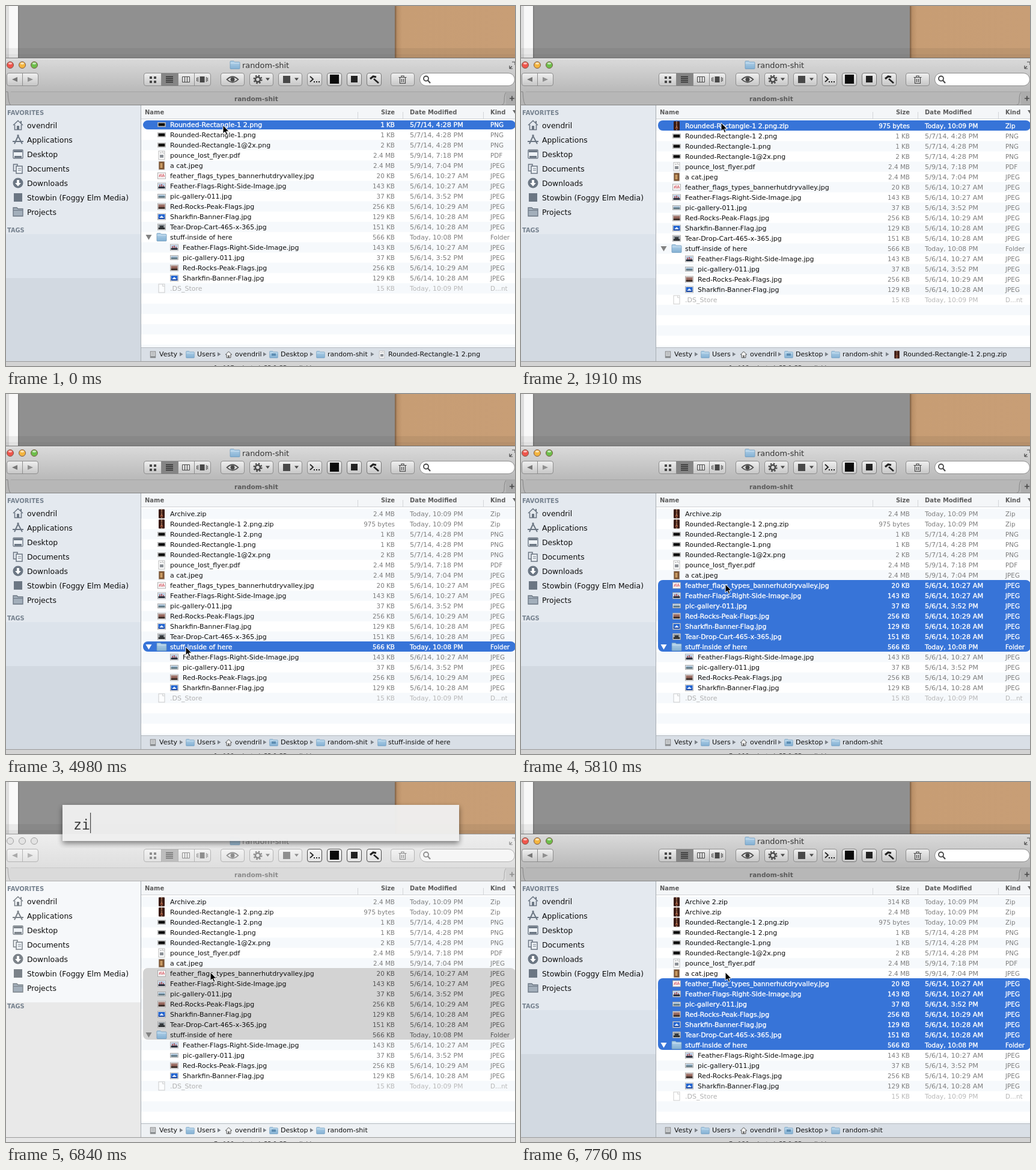
Animation of 847x598 px, one loop 8 s. Source, as an HTML page:

```html
<!DOCTYPE html>
<html lang="en">
<head>
<meta charset="utf-8">
<title>File window</title>
<style>
html, body { margin: 0; width: 100%; height: 100%; overflow: hidden; background: #909090; }
svg { display: block; width: 847px; height: 598px; }
text { font-family: 'DejaVu Sans', sans-serif; white-space: pre; }
.b { font-weight: bold; }
.ui { font-family: 'Liberation Sans', sans-serif; }
.mono { font-family: 'DejaVu Sans Mono', monospace; }
</style>
</head>
<body>
<svg viewBox="0 0 847 598" xmlns="http://www.w3.org/2000/svg">
  <defs>
    <linearGradient id="barOn" x2="0" y2="1"><stop stop-color="#dadada"/><stop offset="1" stop-color="#b8b8b8"/></linearGradient>
    <linearGradient id="barOff" x2="0" y2="1"><stop stop-color="#eeeeee"/><stop offset="1" stop-color="#dedede"/></linearGradient>
    <linearGradient id="btnOn" x2="0" y2="1"><stop stop-color="#f0f0f0"/><stop offset="1" stop-color="#c6c6c6"/></linearGradient>
    <linearGradient id="btnOff" x2="0" y2="1"><stop stop-color="#f4f4f4"/><stop offset="1" stop-color="#e2e2e2"/></linearGradient>
    <linearGradient id="tan"><stop stop-color="#7d5f44"/><stop offset=".02" stop-color="#b98f67"/><stop offset=".06" stop-color="#c79d74"/><stop offset="1" stop-color="#c89e76"/></linearGradient>
    <linearGradient id="fold" x2="0" y2="1"><stop stop-color="#b4d3ea"/><stop offset="1" stop-color="#83b0d3"/></linearGradient>
    <filter id="shade" x="-5%" y="-10%" width="110%" height="130%"><feDropShadow dx="0" dy="4" stdDeviation="5" flood-opacity=".5"/></filter>
  </defs>
  <g id="scene"></g>
  <g id="launcher"></g>
  <path id="cursor" d="M0 0V14L3.3 11L5.7 16.4L8 15.4L5.7 10.2H10Z" fill="#000" stroke="#fff" stroke-width="1"/>
</svg>
<script>
const LOOP = 8000;
const $ = id => document.getElementById(id);

const rect = (x, y, w, h, fill, more = '') => `<rect x="${x}" y="${y}" width="${w}" height="${h}" fill="${fill}" ${more}/>`;
const text = (x, y, size, str, fill, more = '') => `<text x="${x}" y="${y}" font-size="${size}" fill="${fill}" ${more}>${str}</text>`;
const fillPath = (d, fill, more = '') => `<path d="${d}" fill="${fill}" ${more}/>`;
const line = (d, stroke, w = 1, more = '') => `<path d="${d}" fill="none" stroke="${stroke}" stroke-width="${w}" ${more}/>`;
const at = (x, y, body, more = '') => `<g transform="translate(${x} ${y})" ${more}>${body}</g>`;
const END = 'text-anchor="end"', BOLD = 'class="b"';

// Small icons, drawn around their own centre.
const thumb = (top, low, extra = '') =>
  rect(-6.5, -5, 13, 10, '#fff', 'stroke="#9c9c9c" stroke-width=".8"') +
  rect(-5.5, -4, 11, 5, top) + rect(-5.5, 1, 11, 3, low) + extra;
const sheet = rect(-5, -7, 10, 14, '#fff', 'stroke="#b9b9b9"') + fillPath('M1.5 -7V-3.5H5', '#eee', 'stroke="#b9b9b9" stroke-width=".8"');
const icons = {
  png: rect(-6.5, -3.5, 13, 7, '#fff', 'stroke="#a8a8a8" stroke-width=".8"') + rect(-5.5, -2.5, 11, 5, '#0c0c0c'),
  pdf: sheet + rect(-3, -1, 6, 5, '#8b9096') + line('M-3 -4H0', '#999'),
  doc: sheet,
  ghost: rect(-7, -7, 14, 14, '#eef4f6', 'stroke="#c3d3da" stroke-dasharray="1 1"'),
  cat: rect(-5, -7, 10, 14, '#7a5230', 'stroke="#ddd"') + rect(-2.5, -4, 4, 8, '#c89a62'),
  feather: thumb('#fbf1f1', '#f6f6f6', line('M-4 2L-3 -2M-1 2V-3M1 2L3 -3M4 2V-1', '#cf4a55', 1.1)),
  flags: thumb('#b7cde6', '#2c3340', line('M-3 1V-2M0 1V-3M3 1V-1', '#a5322f', 1.4)),
  pic: rect(-6.5, -3.5, 13, 7, '#fff', 'stroke="#9c9c9c" stroke-width=".8"') + rect(-5.5, -2.5, 11, 2.5, '#9fb9cf') + rect(-5.5, 0, 11, 2.5, '#56707c'),
  rocks: thumb('#94645a', '#40302b', line('M-5 -3H5', '#c9b8b4')),
  shark: thumb('#2265d2', '#1747a6', fillPath('M-4 2L0 -2L4 2Z', '#dfe9fa')),
  tear: thumb('#8d949a', '#2e3133', rect(-3, -2, 6, 4, '#34383b')),
  zip: rect(-5, -7.5, 10, 15, '#3a1a13', 'rx="1"') + line('M0 -7V7', '#d8a27c', 2, 'stroke-dasharray="1.2 1.4"') + rect(-2, 2, 4, 3, '#8e4a33'),
  folder: fillPath('M-8 -5.5Q-8 -6.5 -7 -6.5H-2L-.5 -5H7Q8 -5 8 -4V5.5Q8 6.5 7 6.5H-7Q-8 6.5 -8 5.5Z', 'url(#fold)', 'stroke="#6f9bbd" stroke-width=".8"') + line('M-7.5 -3H7.5', '#cfe4f3'),
  drive: rect(-5, -6, 10, 12, '#d2d4d6', 'stroke="#777"') + rect(-5, 3, 10, 3, '#85898c') + line('M-3 -3H3M-3 0H3', '#9a9da0'),
  home: fillPath('M-6 0L0 -6L6 0H4V6H-4V0Z', '#f3f3f3', 'stroke="#444" stroke-width="1.1"') + rect(-1.3, 1.5, 2.6, 4.5, '#555')
};

const row = (name, size, date, kind, icon, deep = 0) => ({ name, size, date, kind, icon, deep });
const FF = ['Feather-Flags-Right-Side-Image.jpg', '143 KB', '5/6/14, 10:27 AM', 'JPEG', 'flags'];
const PG = ['pic-gallery-011.jpg', '37 KB', '5/6/14, 3:52 PM', 'JPEG', 'pic'];
const RR = ['Red-Rocks-Peak-Flags.jpg', '256 KB', '5/6/14, 10:29 AM', 'JPEG', 'rocks'];
const SB = ['Sharkfin-Banner-Flag.jpg', '129 KB', '5/6/14, 10:28 AM', 'JPEG', 'shark'];
const NOW = 'Today, 10:09 PM', PNG_DATE = '5/7/14, 4:28 PM';
const files = [
  row('Rounded-Rectangle-1 2.png', '1 KB', PNG_DATE, 'PNG', 'png'),
  row('Rounded-Rectangle-1.png', '1 KB', PNG_DATE, 'PNG', 'png'),
  row('Rounded-Rectangle-1@2x.png', '2 KB', PNG_DATE, 'PNG', 'png'),
  row('pounce_lost_flyer.pdf', '2.4 MB', '5/9/14, 7:18 PM', 'PDF', 'pdf'),
  row('a cat.jpeg', '2.4 MB', '5/9/14, 7:04 PM', 'JPEG', 'cat'),
  row('feather_flags_types_bannerhutdryvalley.jpg', '20 KB', '5/6/14, 10:27 AM', 'JPEG', 'feather'),
  row(...FF), row(...PG), row(...RR), row(...SB),
  row('Tear-Drop-Cart-465-x-365.jpg', '151 KB', '5/6/14, 10:28 AM', 'JPEG', 'tear'),
  row('stuff-inside of here', '566 KB', 'Today, 10:08 PM', 'Folder', 'folder'),
  row(...FF, 1), row(...PG, 1), row(...RR, 1), row(...SB, 1),
  row('.DS_Store', '15 KB', NOW, 'D...nt', 'doc')
];
const archives = [
  row('Rounded-Rectangle-1 2.png.zip', '975 bytes', NOW, 'Zip', 'zip'),
  row('Archive.zip', '2.4 MB', NOW, 'Zip', 'zip'),
  row('Archive 2.zip', '314 KB', NOW, 'Zip', 'zip')
];

// Last entry whose start time has passed.
const pick = (steps, t) => steps.filter(s => t >= s[0]).pop().slice(1);
const selection = [[0, 0, 0], [530, 1, 1], [1910, 0, 0], [2550, 0, 4], [3630, 1, 5], [4920, 13, 13], [5750, 7, 13], [7690, 8, 14]];
const trail = [
  [0, 'doc', files[0].name], [1910, 'zip', archives[0].name], [2550],
  [4920, 'folder', 'stuff-inside of here'], [5810]
];
const added = [[0, 0], [530, 1], [3630, 2], [7690, 3]];
const fresh = [[0, 0], [530, 1], [860, 0], [3630, 1], [3750, 0], [7690, 1], [7760, 0]];

function backdrop() {
  return rect(0, 0, 847, 90, '#909090') + rect(0, 0, 5, 87, '#dedede') + rect(5, 0, 15, 87, '#f8f8f8') +
    rect(20, 0, 1.5, 87, '#7a7a7a') + rect(647, 0, 200, 90, 'url(#tan)') +
    rect(0, 70, 847, 17, '#000', 'opacity=".06"') + rect(0, 80, 847, 7, '#000', 'opacity=".04"');
}

function toolbar(on) {
  const ink = on ? '#484848' : '#8e8e8e', edge = on ? '#8d8d8d' : '#b4b4b4';
  const key = on ? 'On' : 'Off';
  const button = (x, w, more = edge) => rect(x + .5, 111.5, w - 1, 21, `url(#btn${key})`, `rx="3.5" stroke="${more}"`);
  const down = x => fillPath(`M${x} 119.5h7l-3.5 4.5z`, ink);
  let s = rect(0, 87, 847, 57, `url(#bar${key})`) + rect(0, 86, 847, 1, on ? '#6f6f6f' : '#999') + rect(0, 87, 847, 1, '#f0f0f0');
  ['#f0554c', '#f4b53f', '#6dbf4b'].forEach((c, i) => {
    s += `<circle cx="${7 + i * 20}" cy="98" r="5.5" fill="${on ? c : '#e3e3e3'}" stroke="${on ? '#7c5a4a' : '#a0a0a0'}"/>`;
    if (on) s += `<ellipse cx="${7 + i * 20}" cy="95.5" rx="3" ry="1.7" fill="#fff" opacity=".6"/>`;
  });
  s += at(381, 98, icons.folder, on ? '' : 'opacity=".75"') + text(393, 103, 12.9, 'random-shit', on ? '#333' : '#8a8a8a');
  s += line('M838 104h5M838 104v-5M838 104l4 -4M847 93h-5M847 93v5', ink, 1.2);

  s += button(1, 53) + line('M27.5 112V133', edge) + fillPath('M19 118v8l-9 -4z', on ? '#777' : '#aaa') + fillPath('M36 118v8l9 -4z', on ? '#909090' : '#b5b5b5');
  s += button(229, 112) + rect(258, 112, 28, 21, on ? '#858585' : '#bdbdbd') + line('M258.5 112V133M286.5 112V133M313.5 112V133', edge);
  for (const x of [239, 246]) for (const y of [117, 124]) s += rect(x, y, 4, 4, ink);
  s += line('M266 117.5h12M266 120.5h12M266 123.5h12M266 126.5h12', on ? '#2e2e2e' : '#707070', 1.3);
  s += line('M293.5 117.5h12v9h-12zM297.5 117v9M301.5 117v9', ink);
  s += rect(322.5, 117, 8, 10, ink) + line('M319.5 118v8M333.5 118v8M317.5 119v6M335.5 119v6', ink);
  s += button(357, 40) + line('M367.5 122Q377 113 386.5 122Q377 131 367.5 122Z', ink, 1.7) + `<circle cx="377" cy="122" r="3.5" fill="${ink}"/>`;
  s += button(405, 40) + `<circle cx="419" cy="122" r="4" fill="none" stroke="${ink}" stroke-width="2.6"/><circle cx="419" cy="122" r="6.4" fill="none" stroke="${ink}" stroke-width="2.2" stroke-dasharray="2.5 2.53"/>` + down(432);
  s += button(453, 40) + rect(461, 116, 12, 12, ink) + down(480);
  const dark = on ? '#777' : '#4c4c4c';
  for (const x of [501, 534, 567, 600]) s += button(x, 25, x > 501 || !on ? dark : edge);
  s += line('M506 117l5 4.5l-5 4.5', '#222', 1.8) + rect(512, 125, 2, 2, '#222') + rect(516, 125, 2, 2, '#222') + rect(520, 125, 2, 2, '#222');
  s += rect(539, 114, 15, 15, '#0b0b0b') + rect(574, 116, 11, 11, '#222');
  s += line('M612 121l8 7', '#222', 2.6) + line('M606 121l5 -4l5 1', '#222', 3.2);
  s += button(640, 40) + line('M655.5 119v9.5h9V119M653.5 118.5h13M658 118v-2h4v2M658.5 121v5.5M661.5 121v5.5', ink, 1.2);
  s += rect(688.5, 111.5, 158, 21, on ? '#fff' : '#f6f6f6', `rx="10.5" stroke="${edge}"`) + `<circle cx="699" cy="120.5" r="4" fill="none" stroke="${ink}" stroke-width="1.8"/>` + line('M702 123.5l4 4.5', ink, 2.2);

  s += rect(0, 142, 847, 23, on ? '#b7b7b7' : '#dadada') + rect(0, 164, 847, 1, on ? '#858585' : '#b0b0b0');
  s += line('M0 142.5H3Q4 164 8 164.5M834 142.5Q829 143 829 158Q829 164 824 164.5', on ? '#868686' : '#a9a9a9');
  s += line('M8 142.5H847', on ? '#a5a5a5' : '#c9c9c9') + rect(832, 143, 15, 21, on ? '#acacac' : '#d0d0d0');
  s += line('M838 153.5h8M842 149.5v8', ink, 1.7) + text(380, 158, 10.6, 'random-shit', on ? '#5a5a5a' : '#8a8a8a', BOLD);
  return s;
}

function sidebar(on) {
  const bands = on ? [[165, 214, '#e4e9ef'], [379, 73, '#dce3eb'], [452, 138, '#d2d9e1']] : [[165, 201, '#f6f8fa'], [366, 224, '#e9e9e9']];
  const ink = on ? '#6b7683' : '#7b8289';
  let s = bands.map(([y, h, c]) => rect(0, y, 224, h, c)).join('');
  s += rect(224, 165, 1, 425, '#a8adb3');
  s += text(2, 181, 10, 'FAVORITES', '#76828f', BOLD) + text(2, 376, 9.8, 'TAGS', '#76828f', BOLD);
  const draw = [
    line('M-8 0L0 -7.5L8 0M-5.5 -1V7.5H5.5V-1', ink, 1.6) + rect(-2, 1, 4, 6.5, ink) + rect(4, -7, 2, 4, ink),
    line('M-6 7L1 -8M-1 -8L7 7M-9 3H9', ink, 2),
    rect(-8, -7, 16, 14, '#eef2f6', `rx="1" stroke="${ink}" stroke-width="1.4"`) + rect(-7, -6, 14, 3, ink) + rect(-6, 3, 12, 3, ink),
    line('M-7.5 -7H-1V4H-7.5Z', ink, 1.5) + rect(-3, -4, 10, 12, '#eef2f6', `stroke="${ink}" stroke-width="1.5"`) + line('M0 0H5M0 3H5', ink),
    `<circle r="8.5" fill="${ink}"/>` + fillPath('M-2 -5H2V0H5L0 5.5L-5 0H-2Z', '#fff'),
    rect(-7, -7, 14, 14, ink),
    fillPath('M-8 -7H-2L0 -5H8V7H-8Z', '#a3afbb', `stroke="${ink}" stroke-width="1.3"`) + line('M-8 -2.5H8', ink)
  ];
  ['ovendril', 'Applications', 'Desktop', 'Documents', 'Downloads', 'Stowbin (Foggy Elm Media)', 'Projects'].forEach((name, i) => {
    s += at(20, 198 + i * 24, draw[i]) + text(35, 202.5 + i * 24, 12.4, name, '#0d0d0d');
  });
  return s;
}

function list(rows, top, [from, to], on, newest) {
  let s = rect(225, 187, 622, 380, '#fff');
  for (let y = top - 8.5, i = 0; y < 567; y += 17, i++) {
    if (i % 2 == 0) s += rect(225, y, 622, Math.min(17, 567 - y), '#f6f9fc');
  }
  const y0 = Math.max(190, top + from * 17 - 9), y1 = top + to * 17 + 8;
  s += rect(228, y0, 620, y1 - y0, on ? '#3774d8' : '#d3d3d3', 'rx="8"');
  rows.forEach((r, i) => {
    const y = top + i * 17, base = y + 4, hit = i >= from && i <= to, lit = hit && on;
    const dim = r.icon == 'doc';
    const ink = lit ? '#fff' : dim ? '#b0b0b0' : '#0c0c0c';
    const soft = lit ? '#fff' : dim ? '#b8b8b8' : hit ? '#555' : '#7e7e7e';
    const bold = lit ? 'stroke="#fff" stroke-width=".35"' : '';
    const x = r.deep ? 294 : 273;
    s += at(x - 14, y, icons[newest && !i ? 'ghost' : r.icon], dim ? 'opacity=".7"' : '');
    s += text(x, base, 11, r.name, ink, bold);
    s += text(647, base, 10.4, r.size, soft, `${END} ${bold}`);
    s += text(672, base, r.date[0] == 'T' ? 10.8 : 11.3, r.date, soft, bold);
    s += text(806, base, 10.4, r.kind, soft, bold);
    if (r.icon == 'folder') s += fillPath(`M232.5 ${y - 4}h10l-5 8.5z`, lit ? '#fff' : '#828282');
  });
  s += rect(225, 165, 622, 22, '#f4f6f8') + rect(225, 187, 622, 1, '#d0d3d6');
  s += line('M585.5 176V187M660.5 176V187M794.5 176V187', '#d2d5d8');
  s += text(231, 180, 9.95, 'Name', '#5c5c5c', BOLD) + text(647, 180, 9.95, 'Size', '#5c5c5c', `${BOLD} ${END}`);
  s += text(672, 180, 9.95, 'Date Modified', '#5c5c5c', BOLD) + text(806, 180, 9.95, 'Kind', '#5c5c5c', BOLD);
  return s + fillPath('M843 173h8l-4 6z', '#666');
}

function pathbar(tail, on, count, total) {
  let s = rect(225, 567, 622, 23, on ? '#d9dfe6' : '#eef1f4') + rect(225, 567, 622, 1, '#b5bac0');
  const parts = [
    [238, 'drive', 'Vesty'], [300, 'folder', 'Users'], [364, 'home', 'ovendril'],
    [439, 'folder', 'Desktop'], [517, 'folder', 'random-shit']
  ];
  const labels = [255, 318, 381, 457, 535, 636], arrows = [289, 352, 428, 506, 607];
  if (tail.length) parts.push([619, ...tail]);
  parts.forEach(([x, icon, name], i) => {
    s += at(x + 6.5, 579, `<g transform="scale(.85)">${icons[icon == 'doc' ? 'pdf' : icon]}</g>`) + text(labels[i], 582, 11, name, '#111');
    if (icon == 'folder' && i == 3) s += rect(x + 3, 577, 7, 4, '#5d8db3');
    if (i) s += fillPath(`M${arrows[i - 1]} 575l5.5 3.5l-5.5 3.5z`, '#7b8087');
  });
  s += rect(0, 590, 847, 8, on ? '#d3d3d3' : '#e6e6e6') + rect(0, 590, 847, 1, '#9b9b9b');
  return s + text(430, 604.5, 9.6, `${count} of ${total} selected, 55.9 GB available`, '#333', 'text-anchor="middle"');
}

function scene(t, on) {
  const n = pick(added, t)[0], sel = pick(selection, t);
  const rows = [...archives.slice(0, n).reverse(), ...files];
  return backdrop() + list(rows, n ? 199 : 197, sel, on, pick(fresh, t)[0]) + toolbar(on) + sidebar(on) +
    pathbar(pick(trail, t), on, sel[1] - sel[0] + 1, rows.length);
}

function launcher(typed, found) {
  let s = rect(94, 38, 660, found ? 107 : 60, '#f0f0f0', 'opacity=".96" filter="url(#shade)"');
  s += text(112, 79, 23.3, 'zip'.slice(0, typed), '#3a3a3a', 'class="mono"') + rect(112 + 14 * typed, 51, 1.2, 34, '#444');
  if (!found) return s;
  s += rect(104, 98, 640, 36, '#303030') + rect(113, 102, 20, 26, '#d9692f', 'rx="2"') + rect(113, 102, 20, 6, '#eda06a', 'rx="2"');
  s += line('M123 103V117', '#f6d3b4', 2, 'stroke-dasharray="1.5 1.5"') + rect(115, 117, 16, 8, '#a93d15');
  s += text(123, 124, 6.5, 'ZIP', '#fff', 'class="ui" font-weight="bold" text-anchor="middle"');
  s += text(144, 115, 16, 'Create a zip archive file', '#fff', 'class="ui"') + text(144, 128, 9, 'select on or more files', '#fff', 'class="ui"');
  return s + line('M716 118.5H722Q725 118.5 725 116Q725 113.5 722 113.5H720', '#fff', 1.5) + fillPath('M714 118.5l5 -3.2v6.4z', '#fff');
}

const moves = [
  [0, 361, 198], [740, 361, 198], [960, 349, 219], [1310, 333, 194], [2150, 333, 194], [2550, 329, 262],
  [4110, 329, 262], [4560, 298, 411], [4740, 298, 411], [4920, 299, 420], [5220, 299, 420],
  [5440, 343, 318], [5510, 340, 316], [LOOP, 340, 316]
];
function pointer(t) {
  const i = moves.findIndex(m => m[0] > t), [a, x, y] = moves[i - 1], [b, u, v] = moves[i];
  const k = (t - a) / (b - a), e = k * k * (3 - 2 * k);
  return [x + (u - x) * e, y + (v - y) * e];
}

const drawn = {};
function update(id, key, make) {
  if (drawn[id] === key) return;
  drawn[id] = key;
  $(id).innerHTML = make();
}

function render(t) {
  const on = t < 6470 || t >= 7610;
  const key = [pick(added, t), pick(selection, t), pick(trail, t), pick(fresh, t), on].join('|');
  update('scene', key, () => scene(t, on));
  const open = t >= 6530 && t < 7550, typed = [6650, 6780, 6920].filter(s => t >= s).length, found = t >= 6980;
  update('launcher', [open, typed, found].join(), () => open ? launcher(typed, found) : '');
  $('cursor').setAttribute('transform', `translate(${pointer(t).map(v => v.toFixed(1)).join(' ')})`);
}

const start = performance.now();
function tick() {
  render((performance.now() - start) % LOOP);
  requestAnimationFrame(tick);
}
tick();
</script>
</body>
</html>
```
